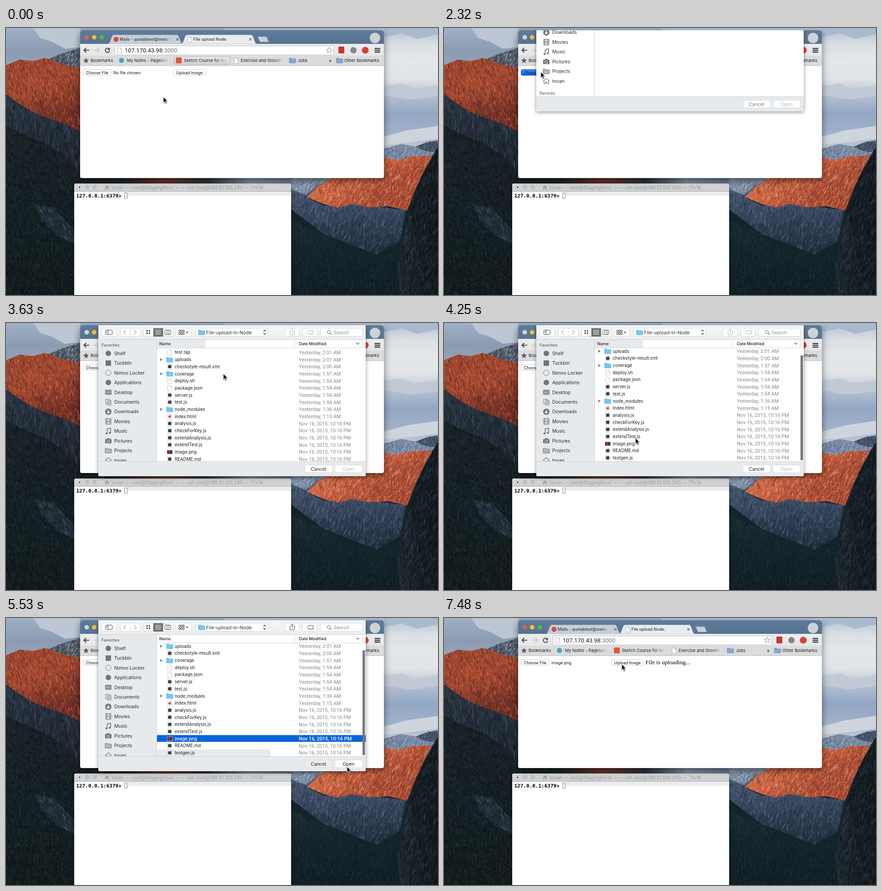
Animation of 950x589 px, one loop 8 s. Source, as an HTML page with a canvas:

```html
<!DOCTYPE html>
<html lang="en">
<head>
<meta charset="utf-8">
<title>File upload</title>
<style>
html, body { margin: 0; width: 100%; height: 100%; overflow: hidden; background: #15242b; }
canvas { display: block; }
</style>
</head>
<body>
<canvas id="stage" width="950" height="589"></canvas>
<script>
const LOOP = 8000;
const UI = "Inter, Roboto, sans-serif";
const TABULAR = "Roboto, sans-serif";
const stage = document.getElementById("stage").getContext("2d");
let g = stage;

// ---------- timeline: [time, ...values], held until the next entry ----------
const cursorKeys = [
  [0, 346, 152], [140, 304, 154], [410, 281, 130], [560, 246, 103], [700, 228, 89],
  [1290, 221, 94], [1430, 215, 97], [1580, 213, 97],
  [3090, 217, 95], [3270, 300, 58], [3420, 428, 32], [3570, 478, 112], [3750, 452, 210], [3920, 421, 254],
  [5080, 470, 286], [5230, 584, 332], [5380, 718, 350], [5530, 750, 328], [5680, 752, 326], [5830, 753, 324],
  [6580, 700, 282], [6730, 560, 194], [6880, 432, 124], [7030, 405, 111], [7180, 391, 102]
];
const CLOSED = -400;
const sheetKeys = [
  [0, CLOSED], [2180, -285], [2320, -154], [2470, -45], [2650, 0],
  [5980, -55], [6130, -150], [6280, -247.5], [6430, CLOSED]
];
const at = (keys, t) => keys.findLast(k => k[0] <= t).slice(1);

// ---------- drawing helpers ----------
function rect(x, y, w, h, fill, r = 0, stroke) {
  g.beginPath();
  g.roundRect(x, y, w, h, r);
  paint(fill, stroke);
}
function circle(x, y, r, fill, stroke) {
  g.beginPath();
  g.arc(x, y, r, 0, 7);
  paint(fill, stroke);
}
function paint(fill, stroke, path) {
  const args = path ? [path] : [];
  if (fill) { g.fillStyle = fill; g.fill(...args); }
  if (stroke) { g.strokeStyle = stroke; g.stroke(...args); }
}
function shape(d, fill, stroke, width = 1, x = 0, y = 0) {
  g.save();
  g.translate(x, y);
  g.lineWidth = width;
  paint(fill, stroke, new Path2D(d));
  g.restore();
}
// y is the middle of the capital letters
function text(s, x, y, size, color = "#1c1c1c", weight = 400, align = "left", family = UI) {
  g.font = `${weight} ${size}px ${family}`;
  g.textAlign = align;
  g.fillStyle = color;
  g.fillText(s, x, y + size * 0.36);
}
function grad(x0, y0, x1, y1, ...colors) {
  const fill = g.createLinearGradient(x0, y0, x1, y1);
  colors.forEach((c, i) => fill.addColorStop(i / (colors.length - 1), c));
  return fill;
}
function fadeText(s, x, y, size, end) {
  text(s, x, y, size, grad(end - 26, 0, end, 0, "#1c1c1c", "rgba(28,28,28,0)"));
}
function withShadow(blur, dy, color, draw) {
  g.save();
  g.shadowBlur = blur;
  g.shadowOffsetY = dy;
  g.shadowColor = color;
  draw();
  g.restore();
}
const page = (x, y, stroke = "#a9adb2") =>
  shape("M.5 .5H6.5L9.5 3.5V12.5H.5ZM6.5 .5V3.5H9.5", "#fff", stroke, 0.9, x, y);
const folder = (x, y, fill, stroke) =>
  shape("M0 2Q0 1 1 1H5L6.5 2.5H13Q14 2.5 14 3.5V10.5Q14 11.5 13 11.5H1Q0 11.5 0 10.5Z", fill, stroke, 1, x, y);

// ---------- wallpaper ----------
function makeRandom(seed) {
  return () => (seed = (seed * 16807) % 2147483647) / 2147483647;
}
// a flat shape roughened with short strokes; lean tilts them, length sets their size
function rock(d, fill, [x, y, w, h], colors, lean, length) {
  const rnd = makeRandom(x * 31 + y * 7 + 1), path = new Path2D(d);
  paint(fill, null, path);
  g.save();
  g.clip(path);
  g.globalAlpha = 0.6;
  for (let i = 0; i < w * h / (length * 1.6); i++) {
    const px = x + rnd() * w, py = y + rnd() * h, len = length * (0.3 + rnd());
    g.beginPath();
    g.moveTo(px, py);
    g.lineTo(px + len * (lean + (rnd() - 0.5) * 0.7), py + len);
    g.lineWidth = 0.5 + rnd() * 1.5;
    g.strokeStyle = colors[Math.floor(rnd() * colors.length)];
    g.stroke();
  }
  g.restore();
}
function drawWallpaper() {
  const { width, height } = stage.canvas;
  rect(0, 0, width, height, "#15242b");
  rect(0, 0, 480, 110, grad(0, 0, 0, 100, "#9fb0c6", "#8b9bb2", "#9aa6b6"));
  rect(480, 0, 470, 300, grad(0, 0, 0, 300, "#b0bfd2", "#dbe0e5", "#e4e7e9", "#e1e4e7", "#b3bfd0", "#93a7c4", "#9dafc8", "#bcc6d2", "#8d9db5"));
  shape("M60 0H163V42L130 46 100 30 75 22Z", "#bcc7d3");
  shape("M831 0H950V14L905 24 870 12 831 20Z", "#a9bacf");
  shape("M831 128L870 122 900 134 950 126V150L890 158 831 148Z", "#c0cad7");
  shape("M831 240L880 226 950 216V244L890 252 831 258Z", "#cdd4dc");

  rock("M163 44L140 51 112 60 88 72 110 88 163 110Z", "#56606e", [85, 44, 80, 66], ["#c3cbd4", "#2b333e", "#3d4653"], -0.5, 6);
  rock("M0 82L30 70 60 73 85 66 105 72 125 80 163 88V228L130 212 95 200 60 186 30 168 0 148Z",
    grad(0, 70, 60, 220, "#994631", "#a94b32", "#6a2c24"), [0, 60, 165, 170], ["#d0704c", "#4b2524", "#7a3327", "#a84a31"], 0.2, 9);
  rock("M0 146L30 168 60 186 95 200 130 212 163 228V340L100 275 0 232Z",
    grad(0, 150, 0, 310, "#2c3644", "#1c252d"), [0, 140, 165, 200], ["#445265", "#11181f", "#232d38"], 0.08, 18);
  rock("M0 215L45 238 95 258 150 300 163 345V589H0Z",
    grad(0, 220, 0, 589, "#1a2328", "#152024", "#101a1c"), [0, 205, 165, 384], ["#2b373a", "#0a1114", "#1d2a2f", "#10191c"], 0.4, 7);
  rock("M62 388L105 396 150 446V476L112 458 80 425Z", "#202e37", [60, 385, 95, 95], ["#40546a", "#121c22", "#1c2930"], 0.7, 7);

  rect(150, 331, 480, 15, grad(163, 0, 627, 0, "#172024", "#1c2428", "#6d3328", "#2a323c", "#8493a8", "#6b7c93"));
  rock("M831 266L870 256 905 262 930 250 950 256V300H831Z", "#7688a2", [831, 250, 119, 50], ["#a8b5c5", "#50617a", "#8798b0"], -0.6, 6);
  rock("M900 262L915 256 930 251 950 248V275L925 272Z", "#435166", [900, 248, 50, 27], ["#2c394a", "#718299"], 0, 5);
  rock("M627 331H730L690 350 662 374 700 392 760 386 880 402 866 470 815 500 760 478 700 455 627 400Z",
    grad(0, 331, 0, 490, "#5c6d85", "#37465d", "#1c2d39"), [627, 331, 255, 175], ["#63769200", "#60738f", "#1a2735", "#2b3b50", "#405169"], -0.3, 11);
  rock("M627 331H722L685 347 660 368 627 356Z",
    "#8495ab", [627, 331, 95, 40], ["#b4c0ce", "#56677f", "#6f8098"], -0.8, 6);
  rock("M662 373L684 350 716 331 790 310 831 286 862 291 893 283 937 281 916 322 902 352 882 403 842 393 800 396 760 388 730 396 700 389Z",
    grad(700, 300, 770, 410, "#cf7c5b", "#c9613f", "#a14632"), [660, 280, 280, 125], ["#eba27c", "#74332b", "#b64f34", "#dd7a54"], -0.5, 8);
  rock("M627 425L690 452 750 485 812 512 880 480V589H627Z",
    grad(0, 425, 0, 589, "#1b2f38", "#14242b", "#101d22"), [627, 425, 255, 165], ["#1f343d", "#0e1b20", "#15262d"], 0, 7);
  rock("M950 262L936 285 920 316 907 346 885 402 874 462 860 530 868 589H950Z",
    grad(860, 0, 950, 0, "#222b34", "#161e24", "#10171b"), [860, 262, 90, 327], ["#3a4552", "#0a0f13", "#1f2831", "#141b21"], -0.3, 12);
}

// ---------- terminal ----------
function drawTerminal() {
  withShadow(10, 4, "rgba(0,0,0,.45)", () => rect(150, 343, 477, 260, "#fff", [4, 4, 0, 0]));
  rect(150, 343, 477, 18, grad(0, 343, 0, 361, "#dcdddd", "#cdcecf"), [4, 4, 0, 0]);
  rect(150, 360, 477, 1, "#adafb1");
  rect(267, 361, 360, 9, "#e9ecef");
  circle(162, 351.5, 5, "#ececec", "#b0b0b0");
  circle(162, 351.5, 1.9, "#444");
  circle(178.5, 351.5, 5, "#c2c3c3");
  circle(195, 351.5, 5, "#c2c3c3");
  shape("M-6 0L0 -5 6 0H4V5H1.5V1H-1.5V5H-4V0Z", "#b9a293", null, 1, 222, 352);
  text("tovan — root@StagingHost: ~ — ssh root@198.51.100.240 — 71×16", 232, 352, 10.6, "#9b9c9d");
  text("127.0.0.1:6379>", 154.5, 370, 11, "#000", 700, "left", "'DejaVu Sans Mono', monospace");
  rect(260.5, 363.5, 6, 12, "#f4f4f4", 0, "#8a8a8a");
}

// ---------- browser ----------
function tab(x0, x1, fill) {
  shape(`M${x0} 35C${x0 + 6} 35 ${x0 + 7} 15 ${x0 + 13} 15H${x1 - 13}C${x1 - 7} 15 ${x1 - 6} 35 ${x1} 35Z`, fill, "#7d90a6", 0.6);
}
const closeMark = x => shape("M-2.5 -2.5L2.5 2.5M2.5 -2.5L-2.5 2.5", null, "#5c5f63", 1.2, x, 25);
const STAR = "M0 -6.5L1.8 -2.2 6.4 -1.9 2.9 1 4 5.5 0 3 -4 5.5 -2.9 1 -6.4 -1.9 -1.8 -2.2Z";

function pageButton(x, w, label, active) {
  rect(x + .5, 91.5, w - 1, 13, active ? grad(0, 91, 0, 105, "#3d8df8", "#0c63ee") : "#fff", 3, active ? "#1a62cf" : "#cfcfcf");
  text(label, x + w / 2, 98.3, 8.9, active ? "#0a1c3c" : "#111", 400, "center");
}
function drawBrowser(t) {
  const modal = t >= 1290 && t < 6430;
  withShadow(16, 6, "rgba(0,0,0,.5)", () => rect(163, 5, 668, 326, "#fff", [5, 5, 4, 4]));
  rect(163, 5, 668, 32, grad(0, 5, 0, 36, "#5f7b9c", "#56728f"), [5, 5, 0, 0]);
  [modal ? "#d0d4d9" : "#e4604f", "#f5bd30", modal ? "#d0d4d9" : "#3fc446"].forEach((c, i) => circle(177.5 + i * 16.5, 20.5, 5, c));
  tab(224, 389, "#c6cfd9");
  tab(385, 552, "#e9ecef");
  shape("M553 19H573L578 31H559Z", "#c6cfd9", "#7d90a6", 0.6);
  circle(242, 25, 5.5, "#d8473a");
  fadeText("Mails - quolabtest@mailo.", 250, 25, 9, 371);
  closeMark(377);
  page(399, 18.5);
  text("File upload Node.", 412, 25, 9);
  closeMark(537.5);
  circle(811.5, 22, 11.5, "#ced2d5");

  rect(163, 35, 668, 27, grad(0, 35, 0, 62, "#ebedef", "#e5e6e7"));
  rect(163, 61, 668, 22, "#dadcdd");
  rect(163, 82.5, 668, 1, "#b3b5b7");
  const arrow = "M6 0H-5M-0.5 -5L-5.5 0 -0.5 5";
  shape(arrow, null, "#484b4f", 2.2, 177, 49);
  g.save();
  g.translate(200, 49);
  g.scale(-1, 1);
  shape(arrow, null, "#c9cbcd", 2.2);
  g.restore();
  shape("M3.6 -3A4.8 4.8 0 1 0 4.8 1.2", null, "#484b4f", 2, 223, 49);
  shape("M5.5 -6V-.5H0Z", "#484b4f", null, 1, 223, 49);
  rect(239.5, 39.5, 481, 20, "#fff", 3, "#b9bcbf");
  page(245, 43);
  text("107.170.43.98", 261, 49.5, 13, "#1a1a1a", 400, "left", TABULAR);
  const hostWidth = g.measureText("107.170.43.98").width;
  text(":3000", 261 + hostWidth, 49.5, 13, "#6f7173", 400, "left", TABULAR);
  shape(STAR, null, "#8b8e91", 1, 711, 49);
  rect(731, 41, 13, 15, "#c9382c", 1);
  circle(764, 49, 7, "#85878a");
  circle(790, 49, 7.5, "#da4232");
  for (let i = 0; i < 3; i++) rect(810.5, 44 + i * 4, 12.5, 2.4, "#3c3e41");

  if (t < 140) rect(369.5, 63, 123, 17, grad(0, 63, 0, 80, "#e9eaeb", "#d3d5d6"), 3, "#aeb0b2");
  shape(STAR, "#5a5c5f", null, 1, 176, 72);
  text("Bookmarks", 186, 72, 9.3);
  circle(254, 71.5, 5.5, "#45a5c4");
  fadeText("My Notes - Pagelum Pr", 266, 72, 9.3, 361);
  rect(373.5, 65, 13, 13, "#e0592f", 2);
  fadeText("Sketch Course for Beg", 391, 72, 9.3, 487);
  page(501, 65.5);
  fadeText("Exercise and Growth -", 516, 72, 9.3, 612);
  folder(623, 65.5, "#86a6cf", "#6f92c0");
  text("Jobs", 641.5, 72, 9.3);
  text("»", 710, 72, 10.5);
  folder(726.5, 65.5, "#86a6cf", "#6f92c0");
  text("Other Bookmarks", 744, 72, 9.3);

  pageButton(169, 63, "Choose File", t >= 1880 && t < 3090);
  text(t < 6580 ? "No file chosen" : "image.png", 236, 98.3, 8.9, "#111");
  pageButton(367, 73, "Upload Image");
  if (t >= 7480) text("File is uploading...", 443, 97.7, 13.2, "#000", 400, "left", "'Liberation Serif', serif");
}

// ---------- file sheet ----------
const places = ["Shelf", "Tuckbin", "Nimvo Locker", "Applications", "Desktop", "Documents", "Downloads", "Movies", "Music", "Pictures", "Projects", "tovan"];
const files = ["test.tap", "uploads", "checkstyle-result.xml", "coverage", "deploy.sh", "package.json", "server.js", "test.js", "node_modules",
  "index.html", "analysis.js", "checkForKey.js", "extendAnalysis.js", "extendTest.js", "image.png", "README.md", "testgen.js"];
const recent = ["2:01", "2:01", "2:00", "1:57", "1:54", "1:54", "1:54", "1:54", "1:36", "1:15"];
const ROW = 15.68, PICKED = 14, GRAY = "#727578";

const placeIcons = [
  () => circle(0, 0, 6, GRAY),
  () => rect(-6, -6, 12, 12, GRAY),
  () => circle(0, 0, 6, null, GRAY),
  () => circle(0, 0, 6, GRAY),
  () => { rect(-6.5, -5, 13, 10, "#a5a8ab", 1, GRAY); shape("M-6 -2.5H6M-6 3H6", null, GRAY); },
  () => { rect(-6, -6, 8, 10, null, 0, GRAY); rect(-2, -3.5, 8, 10, "#d5d8da", 0, GRAY); shape("M0 0H4M0 2.5H4", null, GRAY); },
  () => { circle(0, 0, 7, GRAY); shape("M0 -4V3M-3 .5L0 3.5 3 .5", null, "#fff", 1.8); },
  () => { rect(-6, -6.5, 12, 13, "#d5d8da", 1, GRAY); shape("M-3.5 -6V6M3.5 -6V6M-3.5 0H3.5", null, GRAY, 1.3); },
  () => { shape("M-2.5 5V-5L5 -6.5V3", null, GRAY, 1.6); circle(-4, 5, 2.2, GRAY); circle(3.3, 3.5, 2.2, GRAY); },
  () => { rect(-7, -4, 14, 9.5, GRAY, 1.5); rect(-3, -6, 6, 3, GRAY, 1); circle(0, .8, 3, null, "#e6eaed"); },
  () => folder(-7, -6, "#b4b7ba", GRAY),
  () => shape("M-7 0L0 -6 7 0M-5 -1V6H-1.5V2H1.5V6H5V-1", null, GRAY, 1.2)
];

function fileIcon(name, y) {
  if (!name.includes(".")) {
    folder(353, y - 6, "#76c8f0", "#62b6e2");
    shape("M0 -3.2L5.5 0 0 3.2Z", "#7d7f81", null, 1, 339, y);
  } else if (name.endsWith(".png")) {
    rect(354, y - 4, 12, 8.5, "#4a2227", 0, "#c9ccd0");
    circle(359, y, 2.4, "#c73a3c");
  } else {
    page(355, y - 6.5, "#c6c9cc");
    if (/\.(js|xml|md)$/.test(name)) rect(356.5, y - 3.5, 7, 7, "#3a3c3f", 1);
    if (name.endsWith(".html")) circle(360, y + 0.5, 3, "#d9513f");
    if (name.endsWith(".sh")) shape("M357 -1H362M357 1.5H362", null, "#c6c9cc", 0.8, 0, y);
  }
}
function drawFiles(t) {
  const scroll = t >= 4250 ? 18.4 : 0;
  g.save();
  g.beginPath();
  g.rect(332, 55, 459, 250);
  g.clip();
  if (t >= 5380 && t < 5980) rect(332, 290, 250, 15, "#e7eaec");
  files.forEach((name, i) => {
    const y = 65 + i * ROW - scroll, picked = t >= 4930 && i === PICKED;
    if (picked) rect(332, y - 7.8, 459, 15, "#0865d8");
    fileIcon(name, y);
    const weight = picked ? 500 : 400;
    const date = i < recent.length ? `Yesterday, ${recent[i]} AM` : "Nov 16, 2015, 10:16 PM";
    text(name, 371, y, 9.7, picked ? "#fff" : "#1c1c1c", weight);
    text(date, 644, y, 10.9, picked ? "#fff" : "#86888a", weight, "left", TABULAR);
  });
  if (scroll && t < 5980) rect(784, 71, 5.5, 232, "#747678", 3);
  g.restore();
}
function drawToolbar(t) {
  const box = (x, w) => rect(x + .5, 11.5, w, 18, "#fff", 3, "#d4d6d8");
  const dark = "#3f4144", pale = "#a9abad";
  [[210, 33], [251, 44], [302, 65], [373, 34], [417, 158], [613, 32], [652, 32], [691, 93]].forEach(b => box(...b));
  rect(219.5, 15.5, 14, 10, null, 1, dark);
  shape("M224.5 15.5V25.5M221 18H223M221 20.5H223", null, dark);
  shape("M273.5 12V29", null, "#d4d6d8");
  shape("M263.5 15.5L258.5 20.5 263.5 25.5", null, t < 3270 ? dark : "#b9bbbd", 1.5);
  shape("M281.5 15.5L286.5 20.5 281.5 25.5", null, "#b3b5b7", 1.5);
  for (let i = 0; i < 4; i++) rect(309 + i % 2 * 5, 16 + (i >> 1) * 5, 3, 3, dark);
  rect(324, 11.5, 21.5, 18.5, "#6b6d70");
  shape("M328 16H341M328 19H341M328 22H341M328 25H341", null, "#fff");
  rect(349.5, 15.5, 13, 10, null, 1, dark);
  shape("M354 15.5V25.5M358.5 15.5V25.5", null, dark);
  for (let i = 0; i < 6; i++) rect(380 + i % 3 * 4.5, 15.5 + (i > 2 ? 6 : 0), 3, 4, null, 0, dark);
  shape("M395.5 19L398 21.5 400.5 19", null, dark, 1.3);
  folder(423, 14.5, "#76c8f0", "#62b6e2");
  text("File-upload-in-Node", 440, 21, 10.4, "#333");
  shape("M566 18.5L568.7 15.5 571.4 18.5M566 22.5L568.7 25.5 571.4 22.5", null, dark, 1.3);
  const tools = t >= 4930 ? dark : pale;
  shape("M626.5 18H624.5V26H634.5V18H632.5M629.5 22V13.5M627 16L629.5 13.5 632 16", null, tools);
  shape("M662 20.5L665.5 16.5H675.5V24.5H665.5Z", null, tools);
  circle(710, 20, 3.5, null, "#6c6e70");
  shape("M712.5 22.5L716 26", null, "#6c6e70", 1.3);
  text("Search", 720, 21, 10.4, "#8e9092");
}
function drawSheet(t, offset) {
  if (offset === CLOSED) return;
  const loaded = t >= 2650;
  g.save();
  g.beginPath();
  g.rect(170, 5, 660, 400);
  g.clip();
  g.translate(0, offset);
  withShadow(8, 2, "rgba(0,0,0,.42)", () => rect(203, 5, 588, 333, "#e7eaec", [0, 0, 2, 2]));
  rect(203, 5, 588, 300, "#fff");
  if (loaded) rect(203, 5, 129, 300, "#e6eaed");

  g.save();
  g.beginPath();
  g.rect(203, loaded ? 37 : -100, 129, loaded ? 268 : 405);
  g.clip();
  if (!loaded) g.translate(0, -32);
  text("Favorites", 210, 48.5, 8.9, "#6d7073", 600);
  places.forEach((name, i) => {
    const y = 67 + i * 21.45;
    g.save();
    g.translate(225, y);
    placeIcons[i]();
    g.restore();
    text(name, 238, y, 10.3, "#2b2d2f");
  });
  text("Devices", 210, 329.5, 8.9, "#6d7073", 600);
  g.restore();
  rect(331, 5, 1, 300, "#cfd2d4");

  if (loaded) {
    drawFiles(t);
    rect(203, 5, 588, 31, grad(0, 5, 0, 36, "#f5f6f6", "#eceeef"));
    rect(203, 36, 588, 1, "#cdcfd1");
    drawToolbar(t);
    if (t >= 3420 && t < 4930) rect(332, 37, 106, 18, "#e7eaed");
    rect(332, 54.5, 459, 1, "#d3d5d7");
    rect(634, 37, 1, 17, "#d3d5d7");
    rect(783, 37, 1, 17, "#d3d5d7");
    text("Name", 337, 45.5, 9, "#222", 500);
    text("Date Modified", 644, 45.5, 9, "#222", 500);
    shape("M770.5 44L773.5 47 776.5 44", null, "#4b4d50", 1.2);
  }
  rect(203, 305, 588, 1, "#cfd2d4");
  const faded = t >= 5380 && t < 5980;
  rect(657.5, 313.5, 60, 16.5, faded ? "#eceef0" : "#fff", 3, "#d9dbdd");
  rect(723.5, 313.5, 60, 16.5, t >= 5980 ? "#eceef0" : "#fff", 3, "#d9dbdd");
  text("Cancel", 687, 322, 10.3, loaded ? "#222" : "#77797b", 400, "center");
  text("Open", 753.5, 322, 10.3, t >= 4930 ? "#222" : "#b9bbbd", 400, "center");
  g.restore();
}

function drawCursor([x, y]) {
  withShadow(2, 1, "rgba(0,0,0,.4)", () =>
    shape("M0 0V12.8L3 10 5 14.8 7.2 13.8 5.2 9.2H9.2Z", "#000", "#fff", 1, x, y));
}

// ---------- run ----------
const wallpaper = document.createElement("canvas");
wallpaper.width = 950;
wallpaper.height = 589;
g = wallpaper.getContext("2d");
drawWallpaper();
g = stage;

function frame() {
  const t = performance.now() % LOOP;
  g.drawImage(wallpaper, 0, 0);
  g.lineWidth = 1;
  drawTerminal();
  drawBrowser(t);
  drawSheet(t, at(sheetKeys, t)[0]);
  drawCursor(at(cursorKeys, t));
  requestAnimationFrame(frame);
}
frame();
</script>
</body>
</html>
```
